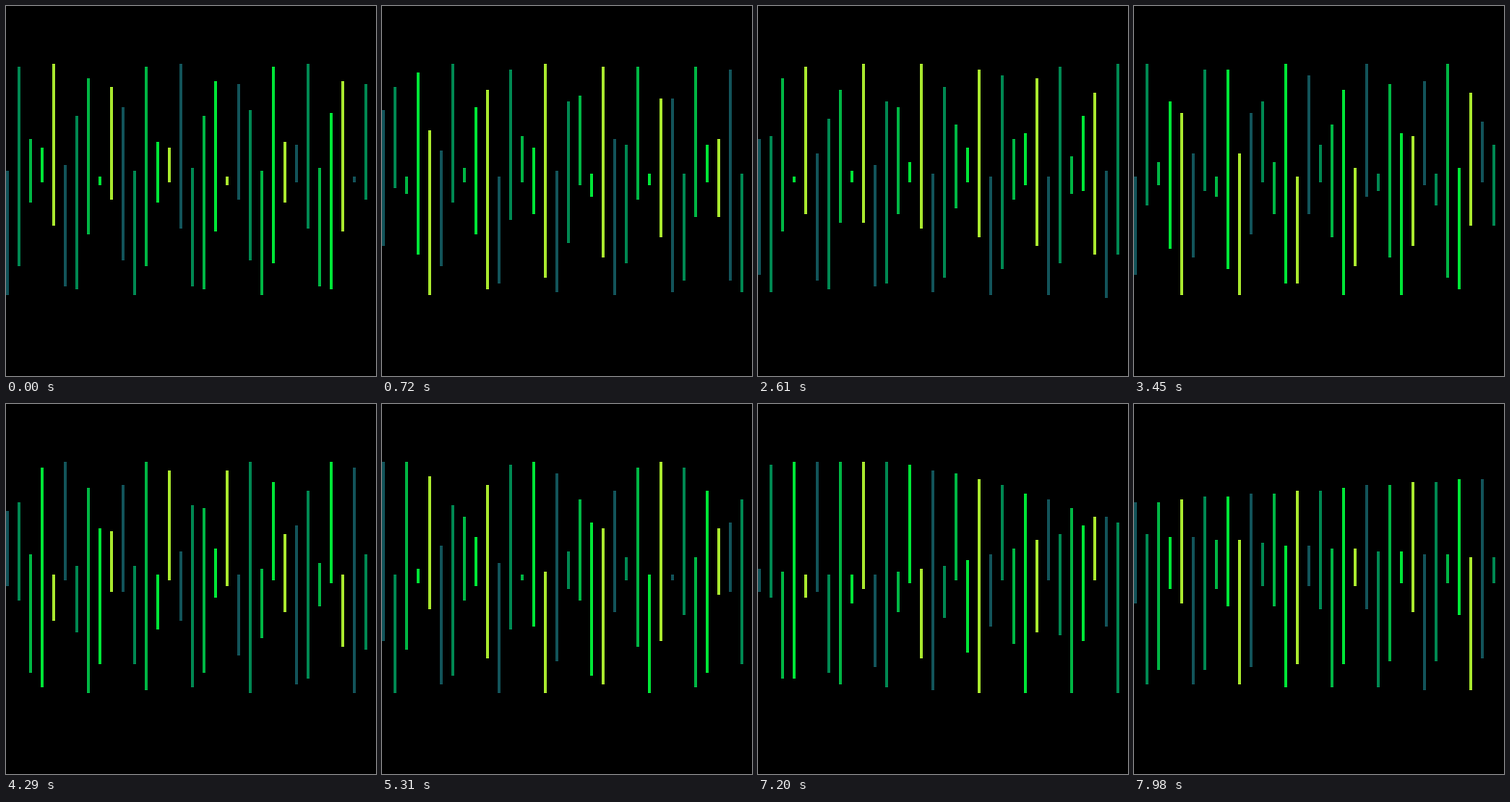
An HTML page with a canvas that plays this animation: 384 px wide and 384 px high, repeating every 8000 ms.

```html
<!DOCTYPE html>
<html lang="en">
<head>
<meta charset="utf-8">
<title>Bars</title>
<style>
  html, body { margin: 0; width: 100%; height: 100%; overflow: hidden; background: #000; }
  canvas { display: block; width: 100vw; height: 100vh; image-rendering: pixelated; }
</style>
</head>
<body>
<canvas id="stage" width="384" height="384"></canvas>
<script>
const ctx = document.getElementById('stage').getContext('2d');
const COLORS = ['#125359', '#008751', '#00b543', '#00e436', '#a8e72e'];
const LOOP = 8000, STEP = 30;
const CELL = 3;            // screen pixels per grid pixel
const BARS = 32, GAP = 4;  // in grid pixels
const MID = 60, REACH = 40;
const FIRST_TICK = 699;

// Smooth wave from 0 to REACH, phase in turns
const wave = turns => REACH / 2 * (1 + Math.cos(2 * Math.PI * turns));

function draw(ms) {
  const tick = FIRST_TICK + Math.floor((ms % LOOP) / STEP);
  const twist = tick / 3840; // phase shift from bar to bar
  ctx.fillStyle = '#000';
  ctx.fillRect(0, 0, 384, 384);
  for (let i = 0; i < BARS; i++) {
    const up = wave(tick / 120 - 0.25 + 2 * twist * i);
    const down = wave(tick / 100 - 0.0005 + twist * i);
    const top = Math.floor(MID - up);
    const bottom = Math.floor(MID + down + 1e-4);
    ctx.fillStyle = COLORS[i % COLORS.length];
    ctx.fillRect(i * GAP * CELL, top * CELL, CELL, (bottom - top + 1) * CELL);
  }
}

const start = performance.now();
function loop() {
  draw(Math.max(0, performance.now() - start));
  requestAnimationFrame(loop);
}
loop();
</script>
</body>
</html>
```
